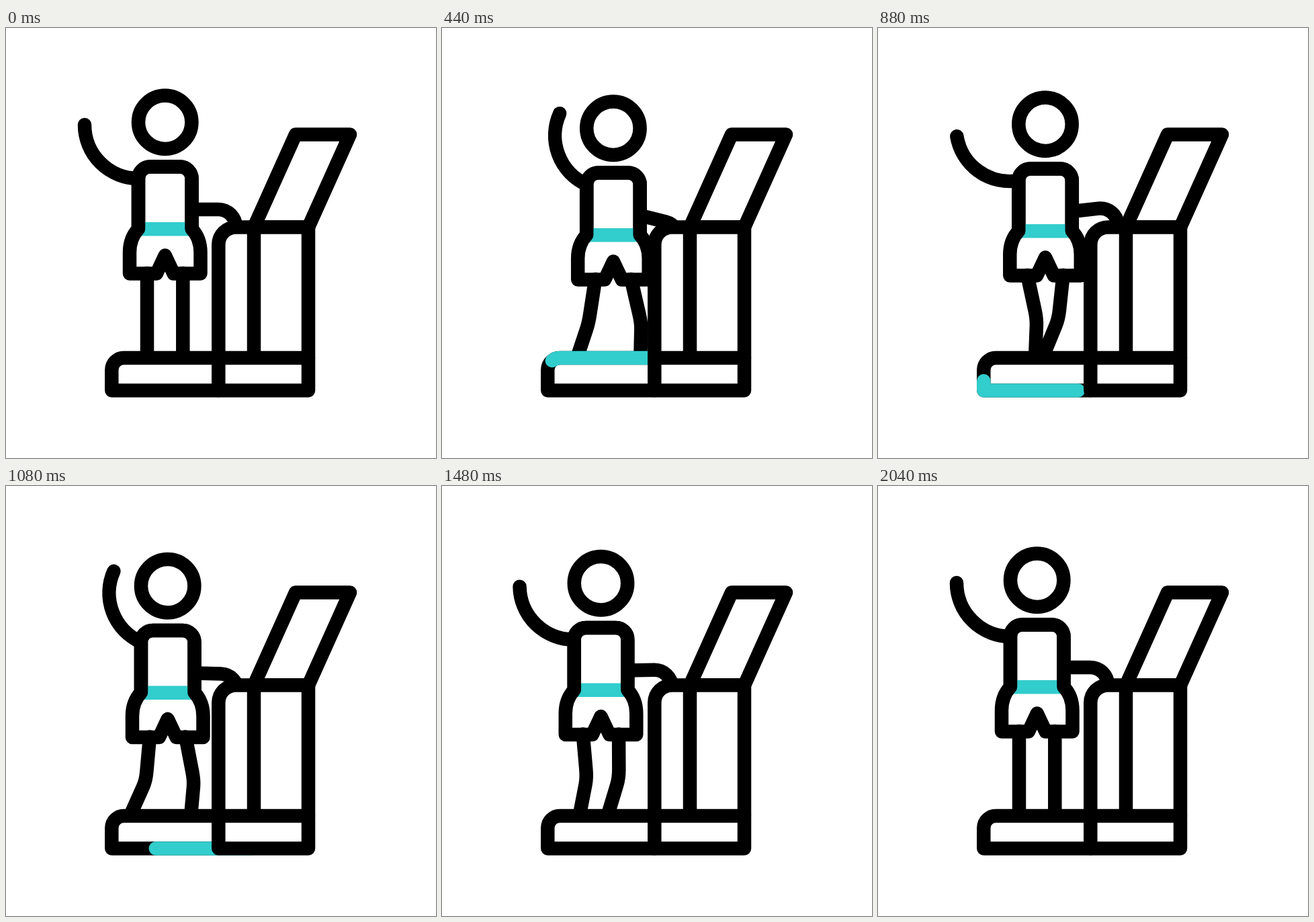
These frames come from a looping animation (640x640 px, 2400 ms). An HTML page:

```html
<!DOCTYPE html>
<html lang="en">
<head>
<meta charset="utf-8">
<title>Treadmill</title>
<style>
  html, body { margin: 0; height: 100%; overflow: hidden; background: #fff; }
  svg { display: block; width: 100vw; height: 100vh; }
  svg * { stroke-linecap: round; stroke-linejoin: round; }
  .ink { fill: #fff; stroke: #000; stroke-width: 20.5; }
  .line { fill: none; stroke: #000; stroke-width: 20.5; }
  .teal { fill: none; stroke: #32cdcd; stroke-width: 20.5; }
</style>
</head>
<body>
<svg viewBox="0 0 640 640">
  <path id="legA" class="line"/>
  <path id="legB" class="line"/>
  <g id="body">
    <path id="wave" class="line" d="M197 224a80 80 0 0 1-80-80"/>
    <path id="hold" class="line" d="M277 270H316a26 26 0 0 1 26 26"/>
    <circle class="ink" cx="236.7" cy="140.3" r="39.7"/>
    <path class="line" fill="none" d="M197 299V224a17.5 17.5 0 0 1 17.5-17.5H259A17.5 17.5 0 0 1 276.5 224V299" style="fill:#fff"/>
    <path class="teal" d="M199 299.3H275"/>
    <path class="line" d="M197 299V224a17.5 17.5 0 0 1 17.5-17.5H259A17.5 17.5 0 0 1 276.5 224V299C285 308 289.5 321 289.5 334V365.5H249.500L236.700 338.500 224 365.500H184V334C184 321 188.500 308 197 299"/>
  </g>
  <path class="ink" d="M316 539.500H157.300V509a18 18 0 0 1 18-18H316"/>
  <path id="belt" class="teal" d="M366 491H175.300a18 18 0 0 0-18 18V539.500H366"/>
  <path class="ink" d="M431 158.500H512L450 296.500H369Z"/>
  <path class="ink" d="M316.300 539.500V322.500a26 26 0 0 1 26-26H450V539.500Z"/>
  <path class="line" d="M369 296.500V491M316.300 491H450"/>
</svg>
<script>
const LOOP = 2400, STEP = 20;
const $ = id => document.getElementById(id);

// Monotone cubic curve through (times, values): turns only at its keys.
function curve(times, values) {
  const last = times.length - 1;
  const slope = i => (values[i + 1] - values[i]) / (times[i + 1] - times[i]);
  const tangent = i => {
    if (i === 0 || i === last) return 0;
    const a = slope(i - 1), b = slope(i);
    return a * b <= 0 ? 0 : 2 * a * b / (a + b);
  };
  return t => {
    if (t <= times[0]) return values[0];
    if (t >= times[last]) return values[last];
    const i = times.findIndex(k => k > t) - 1;
    const span = times[i + 1] - times[i], u = (t - times[i]) / span, w = 1 - u;
    return w * w * ((1 + 2 * u) * values[i] + u * span * tangent(i))
         + u * u * ((3 - 2 * u) * values[i + 1] - w * span * tangent(i + 1));
  };
}

const stride = [0, 340, 440, 600, 750, 880, 1220, 1280, 1660, 1700, 2040];
const walk = (...values) => curve(stride, values);

const shiftX = walk(0, 16, 18.2, 18.7, 17, 12.3, 0, -0.5, 0, 0, 0);
const shiftY = walk(0, 10, 9, 4.8, 0.7, 3, 10.5, 10, 0.8, 1.2, 0);
const kneeA = walk(0, -13, -10, 7, 16, 14, -16, -15, 21, 20, 0);
const footA = walk(0, -32, -25, 0, 22, 12, -43, -42, 26, 25, 0);
const kneeB = walk(0, 18, 15, 0, -10, -7, 22, 21, -15, -14, 0);
const footB = walk(0, 19, 14, -14, -36, -28, 25, 24, -45, -44, 0);
const holdTurn = walk(0, 14, 14, 3, -6, -6.5, 6.5, 6, -6, -6, 0);
const waveTurn = curve(
  [0, 400, 440, 600, 740, 880, 1080, 1280, 1420, 1700, 2040],
  [0, 26, 24.3, -7.7, -28.4, -9.4, 24, 4.7, -4.6, 26.9, 0]);
const beltHead = curve([0, 100, 440, 600, 880, 1080], [0, 36, 203, 280, 390, 458]);
const beltTail = curve([280, 360, 600, 880, 1280, 1440], [0, 20, 112, 235, 393, 458]);

function leg(hipX, hipY, knee, foot) {
  const kneeX = hipX + knee, kneeY = hipY + 65;
  const footX = hipX + foot, footY = 484;
  const near = (x, y) => `${kneeX + (x - kneeX) * 0.2} ${kneeY + (y - kneeY) * 0.2}`;
  return `M${hipX} ${hipY}L${near(hipX, hipY)}Q${kneeX} ${kneeY} ${near(footX, footY)}L${footX} ${footY}`;
}

function draw(t) {
  const x = shiftX(t), y = shiftY(t), hipY = 365 + y;
  $("body").setAttribute("transform", `translate(${x} ${y})`);
  $("wave").setAttribute("transform", `rotate(${waveTurn(t)} 197 224)`);
  $("hold").setAttribute("transform", `rotate(${holdTurn(t)} 277 270)`);
  $("legA").setAttribute("d", leg(210 + x, hipY, kneeA(t), footA(t)));
  $("legB").setAttribute("d", leg(263.3 + x, hipY, kneeB(t), footB(t)));
  const tail = beltTail(t), length = beltHead(t) - tail;
  $("belt").style.display = length > 0 ? "" : "none";
  $("belt").setAttribute("stroke-dasharray", `${Math.max(length, 0)} 999`);
  $("belt").setAttribute("stroke-dashoffset", -tail);
}

const start = performance.now();
function tick() {
  const t = (performance.now() - start) % LOOP;
  draw(t - t % STEP);
  requestAnimationFrame(tick);
}
tick();
</script>
</body>
</html>
```
